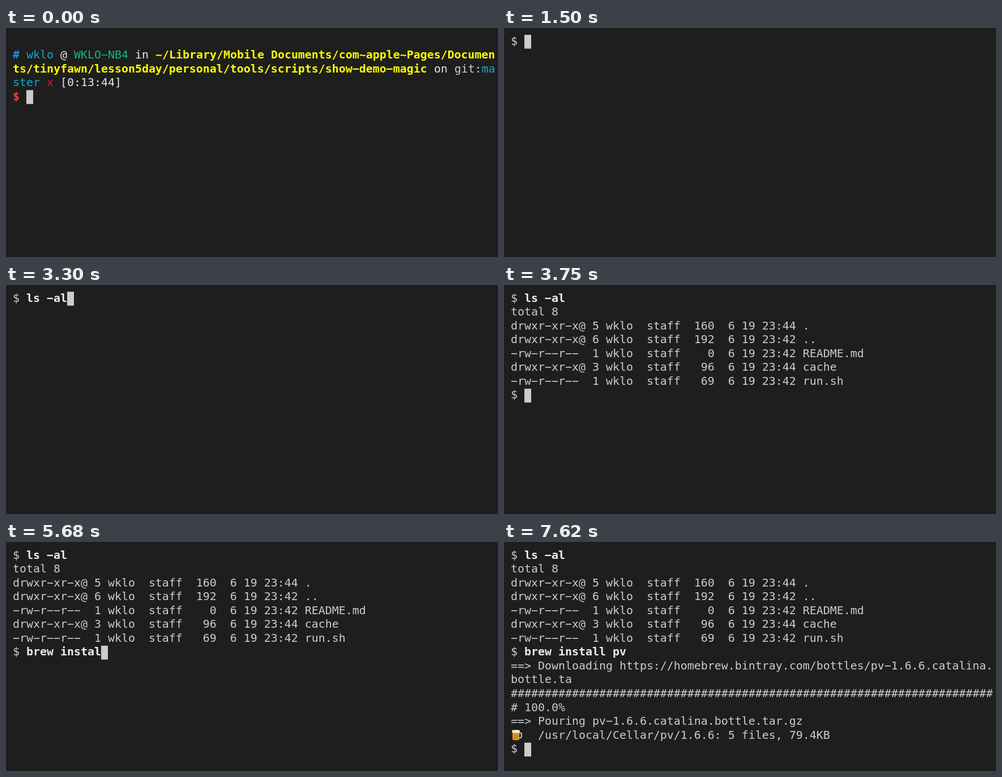
These frames come from a looping animation (869 by 406 pixels, 8 s). An HTML page with a canvas:

```html
<!DOCTYPE html>
<html lang="en">
<head>
<meta charset="utf-8">
<style>
html, body { margin: 0; width: 100%; height: 100%; overflow: hidden; background: #1e1e1e; }
canvas { display: block; }
</style>
</head>
<body>
<canvas id="screen" width="869" height="406"></canvas>
<script>
const ctx = document.getElementById("screen").getContext("2d");
const LOOP = 8000, LEFT = 12, TOP = 12, CELL = 12, LINE = 24.55;
const BG = "#1e1e1e", TEXT = "#cccccc", WHITE = "#e5e5e5", BLUE = "#2090f5", CYAN = "#11a8cd",
      GREEN = "#0dbc79", YELLOW = "#ffff00", RED = "#cd2331", BRIGHT_RED = "#ff3a43";

// A run is [text, colour, bold]; a row is a list of runs.
const prompt = [
  [["#", BLUE, true], [" wklo", CYAN], [" @ ", WHITE], ["WKLO-NB4", GREEN], [" in ", WHITE],
   ["~/Library/Mobile Documents/com~apple~Pages/Documen", YELLOW, true]],
  [["ts/tinyfawn/lesson5day/personal/tools/scripts/show-demo-magic", YELLOW, true],
   [" on ", WHITE], ["git:", TEXT], ["ma", CYAN]],
  [["ster ", CYAN], ["x", RED], [" [0:13:44]", WHITE]],
];
const listing = [
  "total 8",
  "drwxr-xr-x@ 5 wklo  staff  160  6 19 23:44 .",
  "drwxr-xr-x@ 6 wklo  staff  192  6 19 23:42 ..",
  "-rw-r--r--  1 wklo  staff    0  6 19 23:42 README.md",
  "drwxr-xr-x@ 3 wklo  staff   96  6 19 23:44 cache",
  "-rw-r--r--  1 wklo  staff   69  6 19 23:42 run.sh",
];
const install = [
  "==> Downloading https://homebrew.bintray.com/bottles/pv-1.6.6.catalina.",
  "bottle.ta",
  "#".repeat(71),
  "# 100.0%",
  "==> Pouring pv-1.6.6.catalina.bottle.tar.gz",
  "    /usr/local/Cellar/pv/1.6.6: 5 files, 79.4KB",
];

// Key steps are [time, characters visible from then on].
const lsKeys = [[2550, 1], [2700, 3], [2850, 4], [3000, 5], [3300, 6]];
const brewKeys = [[4500, 1], [4790, 3], [4940, 4], [5090, 5], [5240, 7], [5380, 8],
                  [5530, 10], [5680, 11], [5830, 12], [5980, 14], [6120, 15]];

function typed(text, keys, t) {
  const count = keys.reduce((n, [at, shown]) => t >= at ? shown : n, 0);
  return text.slice(0, count);
}

const plain = lines => lines.map(line => [[line, TEXT]]);
const command = text => [["$ ", TEXT], [text, "#eeeeee", true]];

function rowsAt(t) {
  if (t < 1500) {
    const input = typed("bash run.sh", [[300, 5], [600, 11]], t);
    return [[], ...prompt, [["$ ", BRIGHT_RED, true], [input, t < 600 ? TEXT : GREEN]]];
  }
  const rows = [command(typed("ls -al", lsKeys, t))];
  if (t >= 3750) rows.push(...plain(listing), command(typed("brew install pv", brewKeys, t)));
  if (t >= 7620) rows.push(...plain(install), command(""));
  else if (t >= 6570) rows.push([]);
  return rows;
}

function drawRow(runs, y) {
  let x = LEFT;
  for (const [text, color, bold] of runs) {
    ctx.font = `${bold ? "bold " : ""}19.93px "DejaVu Sans Mono", monospace`;
    ctx.fillStyle = color;
    ctx.fillText(text.replaceAll("-", "\u2212"), x, y + 17.5); // wide terminal dash
    x += text.length * CELL;
  }
  return x;
}

function box(color, x, y, w, h, r) {
  ctx.fillStyle = color;
  ctx.beginPath();
  ctx.roundRect(x, y, w, h, r);
  ctx.fill();
}

function drawBeer(x, y) {
  ctx.strokeStyle = "#c9c3b8";
  ctx.lineWidth = 2;
  ctx.beginPath();
  ctx.roundRect(x + 11, y + 7, 8, 9, 3);
  ctx.stroke();
  box("#e39a22", x + 3, y + 4, 12, 16, 2);
  box("#b96a12", x + 6, y + 9, 1.5, 9, 0);
  box("#b96a12", x + 10, y + 9, 1.5, 9, 0);
  box("#f4ead2", x + 2, y + 2, 14, 5, 2.5);
}

function frame(now) {
  const t = now % LOOP;
  ctx.fillStyle = BG;
  ctx.fillRect(0, 0, 869, 406);
  let x, y;
  rowsAt(t).forEach((runs, i) => {
    y = TOP + i * LINE;
    x = drawRow(runs, y);
  });
  ctx.fillStyle = TEXT;
  ctx.fillRect(x, y, CELL, LINE);
  if (t >= 7620) drawBeer(LEFT, TOP + 13 * LINE);
  requestAnimationFrame(frame);
}
requestAnimationFrame(frame);
</script>
</body>
</html>
```
